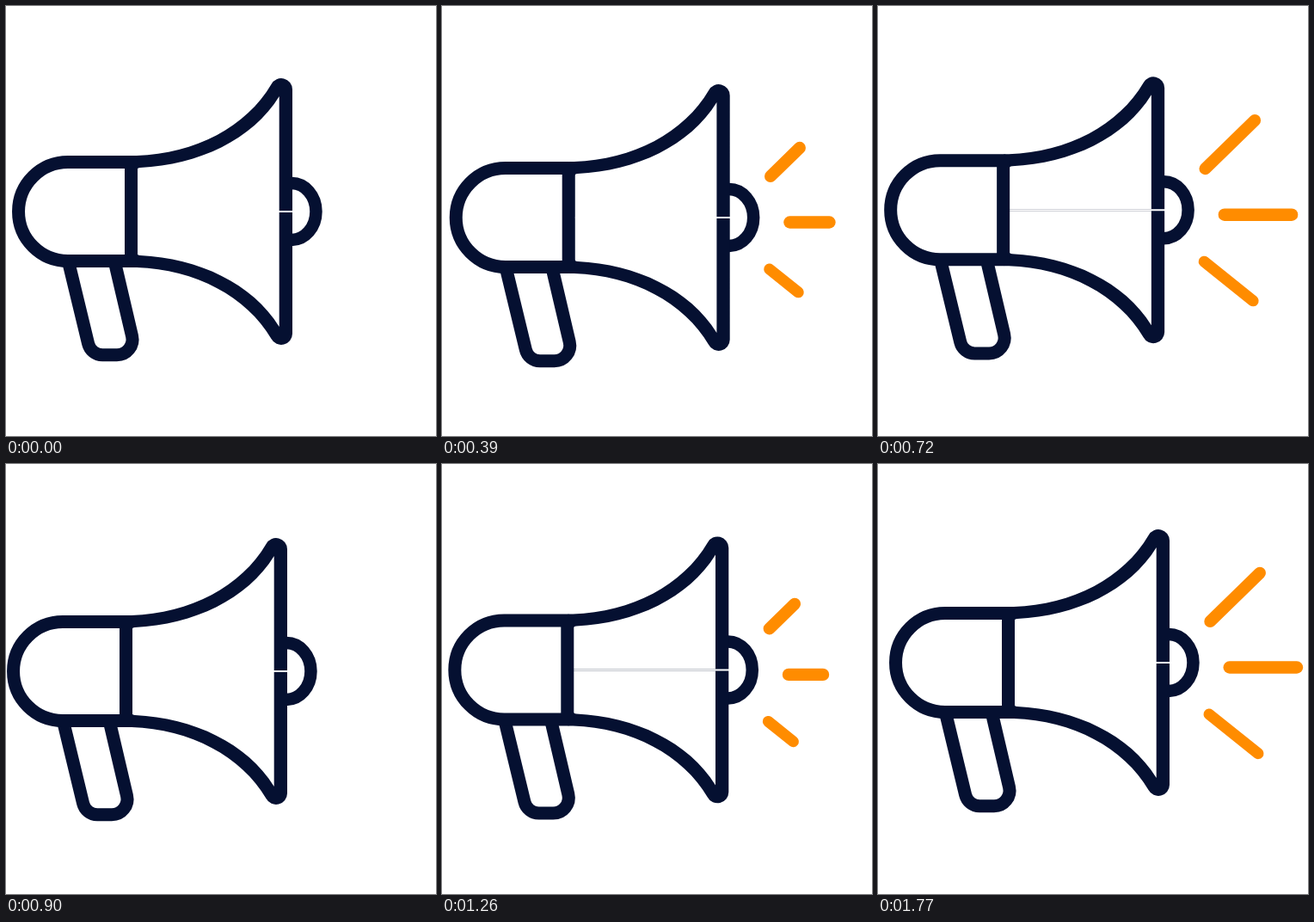
Write an HTML page with a canvas that moves like this. It is 500 px wide and 500 px high and loops after 1800 ms.

```html
<!DOCTYPE html>
<html lang="en">
<head>
<meta charset="utf-8">
<title>Megaphone</title>
<style>
  html, body { margin: 0; width: 100%; height: 100%; overflow: hidden; background: #fff; }
  canvas { display: block; width: 500px; height: 500px; }
</style>
</head>
<body>
<canvas id="stage" width="500" height="500"></canvas>
<script>
const ctx = document.getElementById('stage').getContext('2d');
const NAVY = '#051031', ORANGE = '#ff8c00';
const LOOP = 1800, STEP = 30, BURST = 900;
const MID = 239;

// Key poses of the shake: time, x, y
const poses = [
  [0, 0, 0], [210, -5, 0], [570, -2, 4], [900, -6, 2],
  [1260, 0.3, 0.4], [1560, 1, 4], [1770, 6, -8], [LOOP, 0, 0]
];

// Glide between poses, with a sway to the side and an alternating hop
function offset(t) {
  const i = poses.findIndex(p => p[0] > t) - 1;
  const [t0, x0, y0] = poses[i], [t1, x1, y1] = poses[i + 1];
  const u = (t - t0) / (t1 - t0);
  const ease = (1 - Math.cos(Math.PI * u)) / 2;
  const arc = Math.sin(Math.PI * u);
  const sway = 6.5 * (1 - i / 5), hop = i % 2 ? 5 : -5;
  return [x0 + (x1 - x0) * ease + sway * arc, y0 + (y1 - y0) * ease + hop * arc];
}

function rayGrowth(t) {
  const u = (t % BURST - 120) / 420;
  return u <= 0 ? 0 : Math.min(1, u) ** 1.2;
}

function stroke(path, width, color) {
  ctx.lineWidth = width;
  ctx.strokeStyle = color;
  ctx.stroke(path);
}

function fill(path, color) {
  ctx.fillStyle = color;
  ctx.fill(path);
}

// Upper half of a shape plus its mirror image below the axis
function mirrored(half) {
  const path = new Path2D(half);
  path.addPath(new Path2D(half), new DOMMatrix([1, 0, 0, -1, 0, 2 * MID]));
  return path;
}

const hornOuter = mirrored(
  'M146 240 V174 H152 C220 172 280 140 308.5 91 A13 13 0 0 1 333 97 V240 Z');
const hornInner = mirrored(
  'M152.5 240 V191 Q152.5 188 156 188 C224 185 287 155 317.7 105 V240 Z');
const body = new Path2D('M145.5 181.5 H72 A57.5 57.5 0 0 0 72 296.5 H145.5 Z');
const knob = new Path2D('M332 206 A28.5 33 0 0 1 332 272');
const handle = new Path2D();
handle.moveTo(73.2, 300);
handle.arcTo(98.8, 405.7, 130, 405.7, 17);
handle.arcTo(151.7, 405.7, 126.9, 300, 18);
handle.lineTo(126.9, 300);

function megaphone() {
  stroke(knob, 14.5, NAVY);
  stroke(handle, 15, NAVY);
  fill(hornOuter, NAVY);
  fill(hornInner, '#fff');
  fill(body, '#fff');
  stroke(body, 15, NAVY);
}

function ray(x, y, degrees, length, width) {
  const a = degrees * Math.PI / 180;
  const line = new Path2D();
  line.moveTo(x, y);
  line.lineTo(x + length * Math.cos(a), y + length * Math.sin(a));
  stroke(line, width, ORANGE);
}

function rays(p) {
  if (p <= 0) return;
  ray(380.3, 191, -44.3, 80.6 * p, 14);
  ray(402.7, 244.5, 0, 78.3 * p, 14.4);
  ray(379, 299, 38.7, 73 * p, 13);
}

function draw(now) {
  const t = Math.floor((now % LOOP) / STEP) * STEP;
  ctx.setTransform(1, 0, 0, 1, 0, 0);
  ctx.fillStyle = '#fff';
  ctx.fillRect(0, 0, 500, 500);
  ctx.translate(...offset(t));
  ctx.lineCap = ctx.lineJoin = 'round';
  megaphone();
  rays(rayGrowth(t));
}

const start = performance.now();
function tick() {
  draw(performance.now() - start);
  requestAnimationFrame(tick);
}
tick();
</script>
</body>
</html>
```
